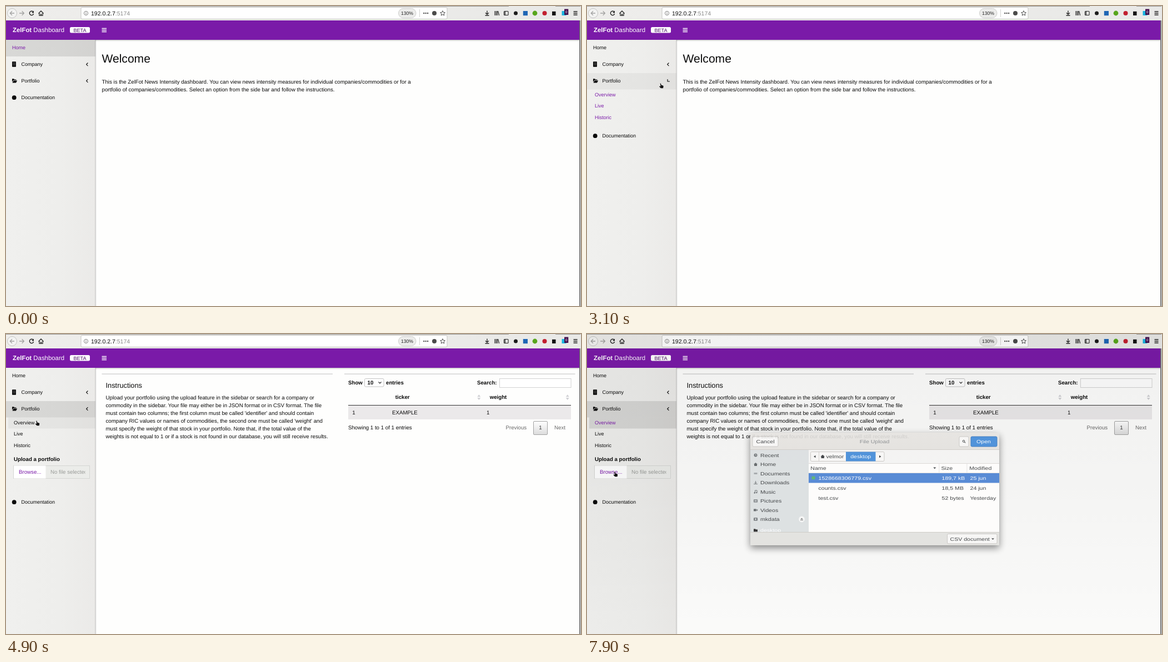
Animation, 1035 px wide and 541 px high, one loop 8 s. Source, as an HTML page:

```html
<!DOCTYPE html>
<html lang="en">
<head>
<meta charset="utf-8">
<title>Dashboard walkthrough</title>
<style>
  html, body { margin: 0; width: 100%; height: 100%; overflow: hidden; background: #fefefd; }
  svg { display: block; width: 1035px; height: 541px; }
  text { font-family: "Liberation Sans", Arial, sans-serif; white-space: pre; text-rendering: geometricPrecision; }
</style>
</head>
<body>
<svg id="stage" viewBox="0 0 1035 541" xmlns="http://www.w3.org/2000/svg"></svg>
<script>
const PURPLE = '#7a1aa8', INK = '#0b0b0b', LOOP = 8000, DROP = 138, SIDE = 161;

// Markup helpers
const attrs = o => Object.entries(o).map(([k, v]) => ` ${k}="${v}"`).join('');
const rect = (x, y, w, h, fill, o = {}) =>
  `<rect x="${x}" y="${y}" width="${w}" height="${h}" fill="${fill}"${attrs(o)}/>`;
const circle = (cx, cy, r, fill, o = {}) =>
  `<circle cx="${cx}" cy="${cy}" r="${r}" fill="${fill}"${attrs(o)}/>`;
const line = (d, stroke = INK, width = 1.1, o = {}) =>
  `<path d="${d}" fill="none" stroke="${stroke}" stroke-width="${width}"${attrs(o)}/>`;
const shape = (d, fill = INK, o = {}) => `<path d="${d}" fill="${fill}"${attrs(o)}/>`;
const group = (body, o = {}) => `<g${attrs(o)}>${body}</g>`;
// Text is placed by its left edge and the middle of its capitals
const text = (x, mid, str, size = 9.7, o = {}) =>
  `<text x="${x}" y="${(mid + size * 0.345).toFixed(2)}" font-size="${size}"${attrs({ fill: INK, ...o })}>${str}</text>`;
const bold = (x, mid, str, size = 9.7, o = {}) => text(x, mid, str, size, { 'font-weight': 700, ...o });
const gradient = (id, stops, vertical) =>
  `<linearGradient id="${id}" x2="${vertical ? 0 : 1}" y2="${vertical ? 1 : 0}">` +
  stops.map(([at, color, alpha = 1]) => `<stop offset="${at}" stop-color="${color}" stop-opacity="${alpha}"/>`).join('') +
  '</linearGradient>';

const defs = `<defs>
  ${gradient('side', [[0, '#f0f0ee'], [0.6, '#eeeeec'], [1, '#ebeae8']])}
  ${gradient('bar', [[0, '#eeedeb'], [1, '#e9e9e7']])}
  ${gradient('edge', [[0, '#000', 0.22], [1, '#000', 0]])}
  ${gradient('under', [[0, '#000', 0.2], [1, '#000', 0]], true)}
  ${gradient('page', [[0, '#fff'], [1, '#dcdcdc']], true)}
  ${gradient('dim', [[0, '#000', 0.05], [0.5, '#000', 0.04], [1, '#000', 0.015]], true)}
  ${gradient('title', [[0, '#e6e4e1'], [1, '#d6d3cf']], true)}
  <clipPath id="menuClip"><rect id="menuRect" x="0" y="150" width="162" height="0"/></clipPath>
  <clipPath id="fileClip"><rect x="72" y="237" width="70.5" height="24"/></clipPath>
  <clipPath id="placesClip"><rect x="294" y="209" width="105" height="148"/></clipPath>
  <filter id="shadow" x="-10%" y="-20%" width="120%" height="140%">
    <feDropShadow dx="0" dy="5" stdDeviation="6.5" flood-color="#000" flood-opacity="0.5"/>
  </filter>
</defs>`;

function toolbar() {
  const grey = '#4b4b4b';
  const menu = [10, 13, 16].map(y => `M1021.5 ${y}h7`).join('');
  return rect(0, 0, 1035, 26, 'url(#bar)') +
    rect(0, 0, 905, 1, '#9a9997') + rect(989, 0, 45, 1, '#9a9997') +
    circle(11, 13, 8.5, '#f3f3f2', { stroke: '#c4c4c2' }) +
    line('M15 13H7.5M11 9.3L7.3 13L11 16.7', '#a3a3a2', 1.3) +
    line('M24 13H32M28.7 9.3L32.4 13L28.7 16.7', '#a3a3a2', 1.3) +
    line('M48.8 10.4A3.7 3.7 0 1 0 49.6 14', '#222', 1.4) + shape('M50 8.5V12.5H46Z', '#222') +
    line('M58.5 13.5L63 9L67.5 13.5M60 13V17.2H66V13', '#222', 1.3) + rect(62.2, 14, 1.7, 3, '#222') +
    rect(135, 2.5, 659, 21, '#fff', { rx: 2, stroke: '#c6c5c3' }) +
    circle(144, 13, 3.6, 'none', { stroke: '#777', 'stroke-width': 0.9 }) +
    rect(143.5, 12.4, 1, 2.7, '#777') + rect(143.5, 10.8, 1, 1, '#777') +
    text(153, 13, '192.0.2.7<tspan fill="#8a8a8a">:5174</tspan>', 10.5) +
    rect(706.5, 4.5, 31.5, 17, '#ececeb', { rx: 8.5, stroke: '#cfcfcd' }) +
    text(722, 13, '130%', 8.6, { 'text-anchor': 'middle', fill: '#222' }) +
    rect(744, 6, 1, 14, '#d3d3d1') +
    [752.3, 755.7, 759.1].map(x => circle(x, 13, 1.2, grey)).join('') +
    circle(771, 13, 4, grey) +
    line('M786 8.6l1.3 2.9 3.1.3-2.3 2.1.7 3.1-2.8-1.6-2.8 1.6.7-3.1-2.3-2.1 3.1-.3z', grey, 1) +
    line('M866 8.5V15M863 12.2L866 15.2L869 12.2M862.5 17H869.5', '#222', 1.3) +
    line('M880 9V17M882.3 9V17M884.4 9V17M885.6 9.2L887.6 17', '#222', 1.2) +
    rect(896.5, 9.5, 7.5, 7, 'none', { stroke: '#222', rx: 1, 'stroke-width': 1.1 }) + rect(897, 10, 2.6, 6, '#777') +
    circle(917.5, 13, 3.5, '#1c1c1c') + rect(930.8, 9, 8.2, 8.2, '#1f66b5') +
    circle(952, 13, 4.4, '#57a61c') + circle(969.5, 13, 4, '#c1202f') +
    rect(983, 9.8, 6.5, 7.2, '#111') + rect(1000.5, 9, 8, 8, '#19b3e0') +
    rect(1005, 5.5, 7.2, 10.5, '#43104f') +
    text(1008.6, 10.7, '0', 6.5, { fill: '#fff', 'text-anchor': 'middle' }) +
    line(menu, '#222', 1.3);
}

function header() {
  const lines = [40.5, 43.5, 46.5].map(y => `M172.5 ${y}h8.5`).join('');
  return rect(SIDE, 61, 874, 3, 'url(#under)') + rect(0, 26, 1035, 35, PURPLE) +
    bold(12, 42.7, 'ZelFot<tspan font-weight="400"> Dashboard</tspan>', 11.4, { fill: '#fff' }) +
    rect(115, 38, 36, 10.5, '#fff', { rx: 2.5 }) +
    text(133, 43.4, 'BETA', 9.1, { fill: '#4b1068', 'text-anchor': 'middle' }) +
    line(lines, '#fff', 1.5);
}

const chevron = (y, id) => group(line('M1.4 -2.8L-1.4 0L1.4 2.8'), { id, transform: `translate(146 ${y})` });

function sidebar() {
  const windows = [102, 104, 106].map(y => [12.6, 14.2, 15.8].map(x => rect(x, y, 1, 0.8, '#999')).join('')).join('');
  const upload = bold(14, 226, 'Upload a portfolio') +
    rect(13.5, 237.5, 137, 23, '#ebece9', { stroke: '#d5d6d3' }) +
    rect(14, 237.5, 57.5, 23, '#fff') + text(23, 248.3, 'Browse...', 9.7, { fill: PURPLE }) +
    group(text(80, 248.5, 'No file selected', 9.7, { fill: '#999b98' }), { 'clip-path': 'url(#fileClip)' });
  const links = ['Overview', 'Live', 'Historic'].map((s, i) => text(14, 160 + i * 20.2, s, 9, { class: 'link' })).join('');
  return rect(0, 61, SIDE, 480, 'url(#side)') +
    rect(0, 61, SIDE, 30, '#000', { id: 'homeBg', opacity: 0.1 }) +
    rect(0, 121, SIDE, 29.5, '#000', { id: 'folderBg' }) +
    rect(0, 0, 0, 0, '#000', { id: 'hover', opacity: 0.045 }) +
    rect(4, 150.5, SIDE - 4, 20, '#000', { id: 'activeBg', opacity: 0.1 }) +
    text(11, 75, 'Home', 9, { id: 'home' }) +
    rect(11, 100.3, 7, 9.4, INK, { rx: 0.6 }) + windows + text(27.4, 105, 'Company', 9) + chevron(105.3, 'c1') +
    shape('M11 137V131.3H14.2L15.2 132.4H18.4V133.8H13.3Z') + shape('M11.4 138.6L13.6 134.4H20.2L18 138.6Z') +
    text(27.4, 135, 'Portfolio', 9) + chevron(135, 'c2') +
    group(links + upload, { 'clip-path': 'url(#menuClip)' }) +
    group(circle(14.7, 165.2, 3.9, INK) + text(27.4, 165, 'Documentation', 9), { id: 'docs' }) +
    rect(SIDE - 0.5, 61, 2.5, 480, 'url(#edge)');
}

const welcome = () => text(172.5, 95.2, 'Welcome', 21.05) +
  text(172.5, 136.3, 'This is the ZelFot News Intensity dashboard. You can view news intensity measures for individual companies/commodities or for a') +
  text(172.5, 150.4, 'portfolio of companies/commodities. Select an option from the side bar and follow the instructions.');

const instructions = () => rect(172.5, 71.3, 415.5, 1.7, '#d9d9d9') + rect(609, 71.3, 415.5, 1.7, '#d9d9d9') +
  text(179.5, 93, 'Instructions', 12.8) + [
    'Upload your portfolio using the upload feature in the sidebar or search for a company or',
    'commodity in the sidebar. Your file may either be in JSON format or in CSV format. The file',
    "must contain two columns; the first column must be called 'identifier' and should contain",
    "company RIC values or names of commodities, the second one must be called 'weight' and",
    'must specify the weight of that stock in your portfolio. Note that, if the total value of the',
    'weights is not equal to 1 or if a stock is not found in our database, you will still receive results.'
  ].map((s, i) => text(179.5, 114.2 + i * 14.1, s)).join('');

function table() {
  const sort = x => shape(`M${x - 3} 113.3h6l-3 -4zM${x - 3} 115h6l-3 4z`, '#d0d0d4');
  const mid = { 'text-anchor': 'middle' };
  return bold(616, 87.3, 'Show') + rect(645.5, 80.5, 34.5, 14.5, '#fff', { rx: 2, stroke: '#c4c4c4' }) +
    bold(650.5, 87.5, '10') + line('M670.5 86.3L673 88.8L675.5 86.3', '#222', 1.2) + bold(684, 87.3, 'entries') +
    bold(848, 88, 'Search:') + rect(888.5, 80.5, 128.5, 16, '#fff', { stroke: '#d2d2d2' }) +
    bold(713.7, 114, 'ticker', 9.7, mid) + bold(886, 114, 'weight', 9.7, mid) + sort(851.3) + sort(1010.7) +
    rect(616, 129, 401, 25, '#ebe9ea') + rect(616, 128, 401, 1, '#333') +
    text(623.2, 141.5, '1') + text(695, 141.5, 'EXAMPLE') + text(865, 141.5, '1') +
    text(616, 169, 'Showing 1 to 1 of 1 entries') +
    text(899.5, 169, 'Previous', 9.7, { fill: '#6a6a6a' }) +
    rect(949.5, 157.5, 25, 24, 'url(#page)', { rx: 1.5, stroke: '#a2a2a2' }) + text(962, 169, '1', 9.7, { ...mid, fill: '#333' }) +
    text(987, 169, 'Next', 9.7, { fill: '#6a6a6a' });
}

// The window is caught while it unfolds, so its lettering is flattened
function dialog() {
  const soft = '#333638';
  const label = (x, y, s, o = {}) => group(text(0, 0, s, 10.6, { fill: soft, ...o }), { transform: `translate(${x} ${y}) scale(1 .82)` });
  const mid = { 'text-anchor': 'middle' }, white = { fill: '#fff' };
  const button = (x, y, w, h, fill = '#f8f7f6', stroke = '#c2bfbb') => rect(x, y, w, h, fill, { rx: 2, stroke, 'stroke-width': 0.9 });
  const icon = i => [
    y => circle(303.5, y, 3, '#6d7275') + line(`M303.5 ${y - 1.6}V${y}H305`, '#eee', 0.7),
    y => shape(`M300 ${y}l3.5 -3 3.5 3h-1v3h-5v-3z`, '#5c6164'),
    y => rect(300.5, y - 1.5, 6, 3, '#a0a5a8'),
    y => line(`M303.5 ${y - 3}V${y + 1}M301.5 ${y - 0.5}L303.5 ${y + 1.5}L305.5 ${y - 0.5}M300 ${y + 2.5}H307`, '#6d7275', 1),
    y => line(`M302.5 ${y + 2}V${y - 2.5}H306V${y + 1.5}`, '#5c6164', 0.9) + circle(301.7, y + 2, 1.2, '#5c6164') + circle(305.2, y + 1.6, 1.2, '#5c6164'),
    y => rect(300, y - 2.5, 7, 5, '#6d7275') + rect(301.3, y - 1, 4.4, 2, '#c9cdd0'),
    y => rect(300, y - 2, 4.7, 4, '#5c6164') + shape(`M304.7 ${y}l2.3 -1.8v3.6z`, '#5c6164'),
    y => rect(300, y - 2.7, 7, 5.4, '#6d7275', { rx: 1 }) + circle(303.5, y, 1.4, '#d5d8da'),
    y => shape(`M300 ${y - 2}h3l1 1h3v4h-7z`, '#222')
  ][i];
  const places = ['Recent', 'Home', 'Documents', 'Downloads', 'Music', 'Pictures', 'Videos', 'mkdata', 'desktop'].map((s, i) => {
    const y = i < 8 ? 218.5 + i * 16.5 : 353.5;
    return icon(i)(y) + label(312, y, s, i < 8 ? {} : white);
  }).join('');
  const files = [['1528668306779.csv', '189,7 kB', '25 jun'], ['counts.csv', '18,5 MB', '24 jun'], ['test.csv', '52 bytes', 'Yesterday']]
    .map(([name, size, date], i) => {
      const y = 259.7 + i * 18.1, o = i ? {} : white;
      return label(416.5, y, name, o) + label(638.5, y, size, o) + label(689.5, y, date, o);
    }).join('');
  return rect(0, 0, 1034, 541, 'url(#dim)') +
    group(
      shape('M294 381V182a4 4 0 0 1 4 -4H738a4 4 0 0 1 4 4V381Z', 'url(#title)') +
      rect(294, 208.5, 448, 1, '#b9b5b0') +
      button(298, 185, 46, 18) + label(321, 193.7, 'Cancel', mid) +
      label(517.5, 193.5, 'File Upload', { ...mid, fill: '#85888a' }) +
      button(670, 185, 17, 18) + circle(678, 193.3, 1.8, 'none', { stroke: soft }) + line('M679.3 194.6L681.3 196.3', soft) +
      button(691, 185, 47, 18, '#3f89d8', '#2c6fb8') + label(714, 193.7, 'Open', { ...mid, ...white }) +
      rect(294, 209, 105, 148, '#dbdfe1') + group(places, { 'clip-path': 'url(#placesClip)' }) +
      circle(386.5, 334, 5.4, '#f5f6f6') + shape('M384 334.3h5l-2.5 -2.6zM384 335.2h5v1h-5z', '#777') +
      rect(399, 209, 343, 24.5, '#f5f4f3') + rect(399, 233.5, 343, 123.5, '#fefdfc') +
      button(402.5, 212.5, 132.5, 17) + rect(466, 212.5, 53.5, 17, '#3f89d8') + rect(417, 212.5, 0.8, 17, '#c8c5c1') +
      shape('M411.5 218.7V223.3L408 221Z', soft) + shape('M526 218.7V223.3L529.5 221Z', soft) +
      shape('M420.5 221l3.7 -3.2 3.7 3.2h-1v3h-5.4v-3z', soft) +
      label(430.5, 220.8, 'velmor') + label(492.7, 220.8, 'desktop', { ...mid, ...white }) +
      rect(399, 233, 343, 0.8, '#d4d1cd') + rect(399, 250, 343, 0.8, '#dedcd9') +
      rect(633.5, 234, 0.8, 16, '#dedcd9') + rect(683.5, 234, 0.8, 16, '#dedcd9') +
      label(402.3, 242, 'Name') + label(637.5, 242, 'Size') + label(688.3, 242, 'Modified') +
      shape('M623.3 240.6h5l-2.5 2.6z', soft) +
      rect(399, 251, 343, 17.5, '#4a80d2') + rect(404.5, 256.7, 6, 5.5, '#54b06a') + files +
      rect(294, 357, 448, 24, '#e2e1de') + rect(294, 357, 448, 0.8, '#c6c3be') +
      button(648.5, 360.5, 89.5, 17.5) + label(653.5, 369.5, 'CSV document') + shape('M728 368.5h5l-2.5 2.6z', soft),
      { opacity: 0.9, filter: 'url(#shadow)' });
}

const outline = { stroke: '#fff', 'stroke-width': 0.6, 'paint-order': 'stroke' };
const pointer =
  group(shape('M.3 0V8.6L2.2 6.9L3.6 9.8L4.9 9.2L3.6 6.3L6.3 6.2Z', '#111', outline), { id: 'arrow' }) +
  group(shape('M2.1.6L3.3.5L4.2 3.6L7.4 4.4L8.2 5.6L7.6 9.3H3.4L.5 6.2L1.2 5.2L3 6Z', '#111', outline), { id: 'hand' });

const stage = document.getElementById('stage');
stage.innerHTML = defs + rect(0, 0, 1035, 541, '#fefefd') +
  group(welcome(), { id: 'welcome' }) + group(instructions(), { id: 'instructions' }) + group(table(), { id: 'table' }) +
  sidebar() + header() + toolbar() +
  rect(1032, 26, 2, 515, '#777') + rect(1034, 0, 1, 541, '#e6e6e5') +
  group(pointer, { id: 'pointer' }) + group(dialog(), { id: 'dialog' });

const el = id => document.getElementById(id);
const links = [...document.querySelectorAll('.link')];
const show = (id, on) => el(id).setAttribute('visibility', on ? 'inherit' : 'hidden');
const set = (node, o) => Object.entries(o).forEach(([k, v]) => node.setAttribute(k, v));

// Pointer stops: time, x, y
const stops = [
  [900, 79, 500], [1100, 84, 440], [1200, 82, 350], [1300, 77, 262], [1400, 74, 200], [1500, 73, 168],
  [1700, 79, 153], [1900, 86, 148], [2000, 98, 140], [2100, 112, 134], [2200, 122, 133], [2300, 128, 136],
  [2400, 129.5, 139], [3700, 110, 152], [3800, 80, 172], [3900, 53, 157], [4100, 52.2, 156],
  [6700, 49.7, 161], [6800, 46, 174], [6900, 42, 191], [7000, 40, 210],
  [7200, 37, 226], [7300, 42, 243], [7400, 46, 254], [7600, 47, 248]
];
// Sidebar rows: top, bottom, left
const closedRows = [[121, 150.5, 0], [151, 181, 0]];
const openRows = [[121, 150.5, 0], [150.5, 170.5, 4], [170.5, 190.5, 4], [190.5, 210.5, 4]];

function draw(t) {
  const opened = t >= 2900, loaded = t >= 4600, chosen = t >= 6800;
  const p = opened ? Math.min(1, (Math.floor((t - 2900) / 100) + 1) / 6) : 0;
  const ease = 0.5 - Math.cos(Math.PI * p) / 2;

  show('welcome', !loaded);
  show('instructions', loaded);
  show('table', t >= 4900);
  show('dialog', t >= 7900);
  show('homeBg', !opened);
  show('activeBg', chosen);
  set(el('home'), { fill: opened ? INK : PURPLE });
  set(el('folderBg'), { opacity: t >= 3900 ? 0.1 : 0 });
  set(el('docs'), { transform: `translate(0 ${DROP * ease})` });
  set(el('menuRect'), { height: DROP * ease });
  set(el('c2'), { transform: `translate(146 135) rotate(${loaded ? 0 : -90 * ease})` });
  links.forEach((link, i) => set(link, { fill: !loaded || (chosen && !i) ? PURPLE : INK }));

  const stop = stops.filter(s => s[0] <= t).pop();
  show('pointer', stop);
  set(el('hover'), { width: 0, height: 0 });
  if (!stop) return;
  const [, x, y] = stop;
  const row = (opened ? openRows : closedRows).find(([top, end]) => y + 1 >= top && y + 1 < end);
  const onLink = row || (opened && y > 237 && y < 260);
  show('hand', onLink);
  show('arrow', !onLink);
  set(el('pointer'), { transform: `translate(${x} ${y})` });
  if (row) set(el('hover'), { x: row[2], y: row[0], width: SIDE - row[2], height: row[1] - row[0] });
}

const start = performance.now();
function tick() {
  draw((performance.now() - start) % LOOP);
  requestAnimationFrame(tick);
}
tick();
</script>
</body>
</html>
```
